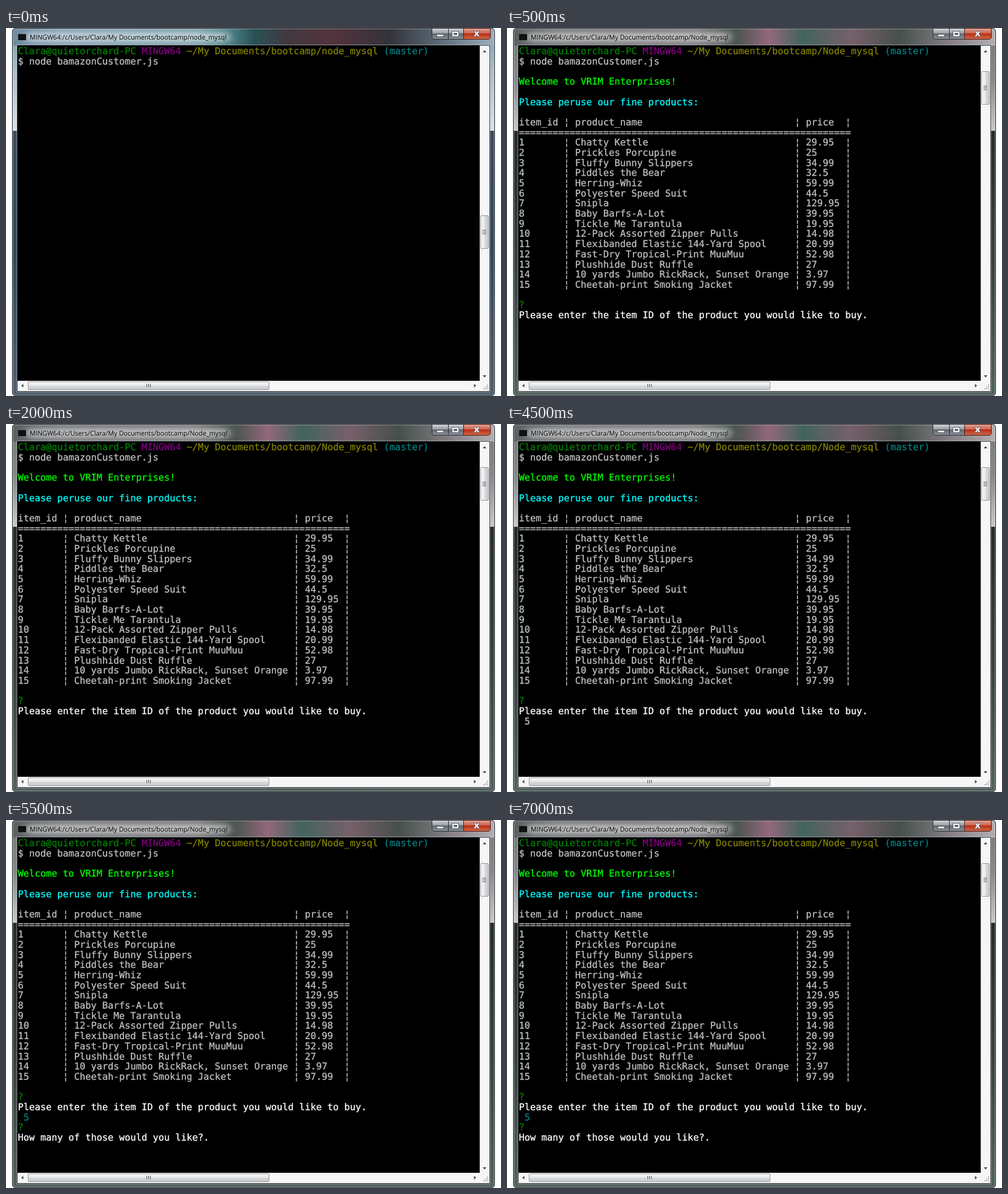
Recreate the animation shown at these times as an HTML page. Size 814x605 px, loop 8000 ms.

```html
<!DOCTYPE html>
<html lang="en">
<head>
<meta charset="utf-8">
<title>Terminal shop</title>
<style>
  html, body { margin: 0; width: 100%; height: 100%; overflow: hidden; background: #fff; }
  #stage { position: relative; width: 814px; height: 605px; overflow: hidden; }
  svg, pre { position: absolute; }
  svg { left: 0; top: 0; }
  pre {
    left: 19.4px; top: 30.4px; margin: 0; color: #c0c0c0;
    font: 15.38px/16.67px "DejaVu Sans Mono", monospace;
    text-rendering: geometricPrecision;
    -webkit-text-stroke: .3px;
  }
  pre .early { position: absolute; }
  .title { font: 10.75px "Open Sans", sans-serif; text-rendering: geometricPrecision; }
  .green { color: #008000; }
  .purple { color: #800080; }
  .olive { color: #808000; }
  .teal { color: #008080; }
  .lime { color: #0f0; }
  .aqua { color: #0ff; }
  .white { color: #fff; }

  .early { animation: early 8s step-end infinite; }
  .late { animation: late 8s step-end infinite; }
  .typed { animation: typed 8s step-end infinite; }
  .asked { animation: asked 8s step-end infinite; }
  .thumb { animation: thumb 8s step-end infinite; }
  @keyframes early { 0% { visibility: visible } 6.25%, 100% { visibility: hidden } }
  @keyframes late { 0% { visibility: hidden } 6.25%, 100% { visibility: visible } }
  @keyframes typed {
    0% { visibility: hidden; color: #c0c0c0 }
    37.5% { visibility: visible; color: #c0c0c0 }
    68.75%, 100% { visibility: visible; color: #008080 }
  }
  @keyframes asked { 0% { visibility: hidden } 68.75%, 100% { visibility: visible } }
  @keyframes thumb {
    0% { transform: translateY(308px) }
    6.25%, 100% { transform: translateY(71px) }
  }
</style>
</head>
<body>
<div id="stage">
<svg width="814" height="605" viewBox="0 0 814 605">
  <defs>
    <linearGradient id="blueBar">
      <stop offset="0" stop-color="#6f8a9f"/>
      <stop offset=".1" stop-color="#86a2b4"/>
      <stop offset=".38" stop-color="#7fa3ae"/>
      <stop offset=".45" stop-color="#4d8288"/>
      <stop offset=".5" stop-color="#285256"/>
      <stop offset=".57" stop-color="#42383f"/>
      <stop offset=".66" stop-color="#54333c"/>
      <stop offset=".78" stop-color="#33323a"/>
      <stop offset=".88" stop-color="#596773"/>
      <stop offset="1" stop-color="#9db0bf"/>
    </linearGradient>
    <linearGradient id="roseBar">
      <stop offset="0" stop-color="#5c6062"/>
      <stop offset=".1" stop-color="#77797c"/>
      <stop offset=".38" stop-color="#7d7b7e"/>
      <stop offset=".46" stop-color="#4a5450"/>
      <stop offset=".53" stop-color="#92687a"/>
      <stop offset=".6" stop-color="#42645d"/>
      <stop offset=".7" stop-color="#77606a"/>
      <stop offset=".8" stop-color="#46504c"/>
      <stop offset=".9" stop-color="#827c82"/>
      <stop offset="1" stop-color="#b4afb4"/>
    </linearGradient>
    <linearGradient id="blueSide" x2="0" y2="1">
      <stop offset="0" stop-color="#7d97a9"/>
      <stop offset=".12" stop-color="#aabdca"/>
      <stop offset=".28" stop-color="#dae3e9"/>
      <stop offset=".28" stop-color="#3b4d5c"/>
      <stop offset=".6" stop-color="#31485a"/>
      <stop offset="1" stop-color="#50616e"/>
    </linearGradient>
    <linearGradient id="roseSide" x2="0" y2="1">
      <stop offset="0" stop-color="#777779"/>
      <stop offset=".14" stop-color="#85868a"/>
      <stop offset=".28" stop-color="#c9c9cb"/>
      <stop offset=".28" stop-color="#252a2b"/>
      <stop offset=".65" stop-color="#39413f"/>
      <stop offset="1" stop-color="#52625e"/>
    </linearGradient>
    <linearGradient id="close" x2="0" y2="1">
      <stop offset="0" stop-color="#e3a59a"/>
      <stop offset=".45" stop-color="#cd6452"/>
      <stop offset=".5" stop-color="#b52f18"/>
      <stop offset="1" stop-color="#d4694a"/>
    </linearGradient>
    <linearGradient id="btn" x2="0" y2="1">
      <stop offset="0" stop-color="#d5d8dc"/>
      <stop offset=".45" stop-color="#989da3"/>
      <stop offset=".5" stop-color="#626970"/>
      <stop offset="1" stop-color="#8b9299"/>
    </linearGradient>
    <linearGradient id="tall">
      <stop offset="0" stop-color="#f6f6f6"/>
      <stop offset=".5" stop-color="#e9e9eb"/>
      <stop offset=".5" stop-color="#d8dadc"/>
      <stop offset="1" stop-color="#c9cbce"/>
    </linearGradient>
    <linearGradient id="wide" href="#tall" x2="0" y2="1"/>
    <filter id="soft" x="-10%" y="-100%" width="120%" height="300%">
      <feGaussianBlur stdDeviation="7 4"/>
    </filter>
    <clipPath id="frame"><rect x="10" width="794" height="605" rx="6"/></clipPath>
  </defs>

  <g clip-path="url(#frame)">
    <g class="early">
      <rect x="10" width="794" height="605" fill="url(#blueSide)"/>
      <rect x="10" width="794" height="29" fill="url(#blueBar)"/>
    </g>
    <g class="late">
      <rect x="10" width="794" height="605" fill="url(#roseSide)"/>
      <rect x="10" width="794" height="29" fill="url(#roseBar)"/>
    </g>
    <rect x="32" y="8" width="336" height="14" rx="7" fill="#fff" opacity=".55" filter="url(#soft)"/>
  </g>
  <g fill="none">
    <rect x="11.5" y="1.5" width="791" height="602" rx="5" stroke="#fff" stroke-opacity=".4"/>
    <rect x="10.5" y=".5" width="793" height="604" rx="6" stroke="#1d2226"/>
    <rect x="17.5" y="27.5" width="779" height="571" stroke="#fff" stroke-opacity=".3"/>
    <rect x="18.5" y="28.5" width="777" height="569" stroke="#30383e"/>
  </g>

  <rect x="20" y="10" width="13" height="10" fill="#111"/>
  <text class="title early" x="39" y="18.5">MINGW64:/c/Users/Clara/My Documents/bootcamp/node_mysql</text>
  <text class="title late" x="39" y="18.5">MINGW64:/c/Users/Clara/My Documents/bootcamp/Node_mysql</text>

  <g stroke="#2b3035">
    <path d="M700.5 .5H727.5V18.5H705q-4.5 0-4.5-4.5Z" fill="url(#btn)"/>
    <path d="M727.5 .5H752.5V18.5H727.5Z" fill="url(#btn)"/>
    <path d="M752.5 .5H796.5V14q0 4.5-4.5 4.5H752.5Z" fill="url(#close)" stroke="#4b1a14"/>
  </g>
  <g stroke="#454b52" stroke-width=".8" fill="#fff">
    <rect x="708.5" y="10.5" width="11" height="3.5"/>
    <path fill-rule="evenodd" d="M733.5 5.5h11v8.5h-11ZM736.5 8.5v2.5h5v-2.5Z"/>
    <path d="M768.5 5h3.5l2 2.4 2-2.4h3.5l-3.6 4.500 3.600 4.500h-3.500l-2-2.400-2 2.400h-3.500l3.600-4.500Z"/>
  </g>

  <rect x="19" y="29" width="776" height="568" fill="#f6f6f6"/>
  <rect x="19" y="29" width="760" height="551" fill="#000"/>
  <path d="M784 40l3-3.5 3 3.5ZM784 571l3 3.5 3-3.5ZM28.5 585l-3.5 3 3.5 3ZM769.5 585l3.5 3-3.5 3Z" fill="#444"/>
  <g class="thumb">
    <rect x="780.5" y=".5" width="13" height="54" rx="1.5" fill="url(#tall)" stroke="#999"/>
    <path d="M783.5 24.5h6m-6 3h6m-6 3h6" stroke="#555"/>
  </g>
  <rect x="36.5" y="581.5" width="396" height="13" rx="1.5" fill="url(#wide)" stroke="#999"/>
  <path d="M231.5 585v5.5m3-5.5v5.5m3-5.5v5.5" stroke="#555"/>
  <path d="M791 587h2m-5 3h2m1 0h2m-8 3h2m1 0h2m1 0h2" stroke="#b8b8b8" stroke-width="2"/>
</svg>

<pre><span class="green">Clara@quietorchard-PC</span> <span class="purple">MINGW64</span> <span class="olive">~/My Documents/bootcamp/<span class="early">n</span><span class="late">N</span>ode_mysql</span> <span class="teal">(master)</span>
$ node bamazonCustomer.js
<span class="late">
<span class="lime">Welcome to VRIM Enterprises!</span>

<span class="aqua">Please peruse our fine products:</span>

<span id="table"></span>

<span class="green">?</span>
<span class="white">Please enter the item ID of the product you would like to buy.</span>
</span><span class="typed"> 5</span>
<span class="asked"><span class="green">?</span>
<span class="white">How many of those would you like?.</span></span></pre>
</div>
<script>
  const products = [
    ["Chatty Kettle", 29.95],
    ["Prickles Porcupine", 25],
    ["Fluffy Bunny Slippers", 34.99],
    ["Piddles the Bear", 32.5],
    ["Herring-Whiz", 59.99],
    ["Polyester Speed Suit", 44.5],
    ["Snipla", 129.95],
    ["Baby Barfs-A-Lot", 39.95],
    ["Tickle Me Tarantula", 19.95],
    ["12-Pack Assorted Zipper Pulls", 14.98],
    ["Flexibanded Elastic 144-Yard Spool", 20.99],
    ["Fast-Dry Tropical-Print MuuMuu", 52.98],
    ["Plushhide Dust Ruffle", 27],
    ["10 yards Jumbo RickRack, Sunset Orange", 3.97],
    ["Cheetah-print Smoking Jacket", 97.99]
  ];
  const row = (id, name, price) =>
    `${String(id).padEnd(7)} ¦ ${name.padEnd(38)} ¦ ${String(price).padEnd(6)} ¦`;
  document.getElementById("table").textContent = [
    row("item_id", "product_name", "price"),
    "=".repeat(59),
    ...products.map(([name, price], i) => row(i + 1, name, price))
  ].join("\n");
</script>
</body>
</html>
```
